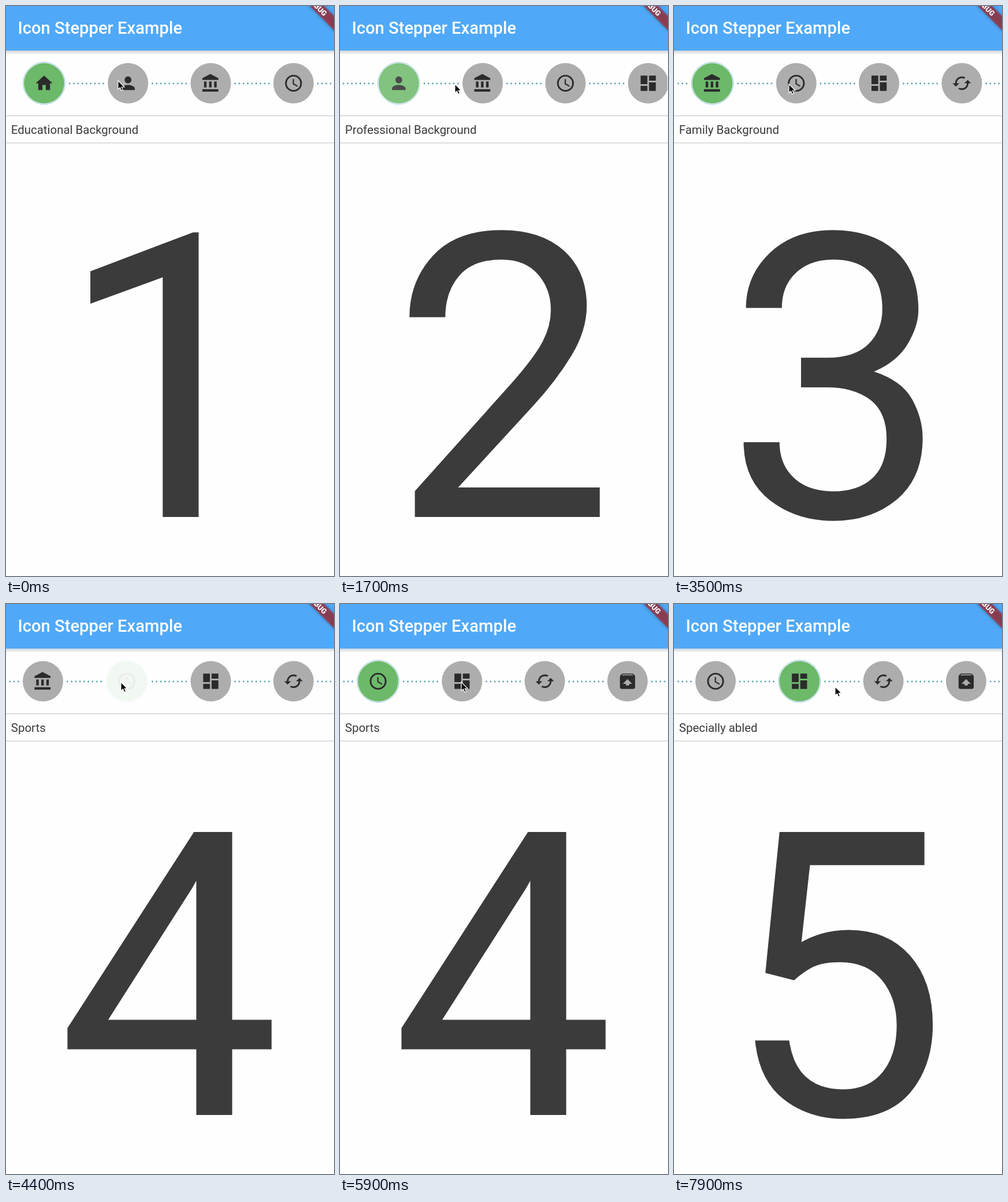
Animation of 568 by 985 pixels, one loop 8000 ms. Source, as an HTML page:

```html
<!DOCTYPE html>
<html lang="en">
<head>
<meta charset="utf-8">
<title>Icon Stepper Example</title>
<style>
  html, body { margin: 0; width: 100%; height: 100%; overflow: hidden; background: #fefefe; }
  svg { display: block; width: 568px; height: 985px; font-family: Roboto, sans-serif; }
</style>
</head>
<body>
<svg viewBox="0 0 568 985">
  <defs>
    <linearGradient id="shade" x2="0" y2="1">
      <stop offset="0" stop-color="#cfd6dc"/>
      <stop offset="1" stop-color="#f4f4f4"/>
    </linearGradient>
    <clipPath id="view"><rect x="4" y="84" width="563" height="104"/></clipPath>
  </defs>
  <rect width="568" height="985" fill="#fefefe"/>
  <rect y="77" width="568" height="6" fill="url(#shade)"/>
  <rect width="568" height="77" fill="#50a9f8"/>
  <text x="20.4" y="47.5" font-size="29.2" font-weight="500" fill="#fff">Icon Stepper Example</text>
  <g transform="translate(553.5 15) rotate(45)">
    <rect x="-80" y="-8.8" width="160" height="17.6" fill="#b71c1c" fill-opacity=".63"
          style="filter: drop-shadow(0 0 3px rgba(0,0,0,.5))"/>
    <text y="4.5" font-size="12.6" font-weight="900" fill="#fff" text-anchor="end">DEBUG</text>
  </g>
  <g id="stepper" clip-path="url(#view)"></g>
  <path d="M0 189.7H568M0 236.7H568" stroke="#ccc" stroke-width="1.2"/>
  <text id="label" x="8.8" y="221" font-size="20.44" fill="#3a3a3a"></text>
  <text id="digit" x="282" y="883" font-size="688" fill="#3b3b3b" text-anchor="middle"></text>
  <path id="cursor" d="M0 0V15.2L3.5 12 5.8 17.2 8.4 16.1 6.2 11H11Z" stroke="#fff" stroke-width="1.2"/>
</svg>
<script>
const LOOP = 8000, GAP = 73.3, STEP = 70 + GAP, LEFT = 29, MID = 133.5;
const FADE = 750, SCROLL = 1000, LAG = 95;
const clicks = [1062, 2680, 4340, 6060];
const labels = ['Educational Background', 'Professional Background', 'Family Background',
  'Sports', 'Specially abled'];

// Material icons on a 24 unit grid
const icons = [
  'M10 20v-6h4v6h5v-8h3L12 3 2 12h3v8z',
  'M12 12c2.21 0 4-1.79 4-4s-1.79-4-4-4-4 1.79-4 4 1.79 4 4 4zm0 2c-2.67 0-8 1.34-8 4v2h16v-2c0-2.66-5.33-4-8-4z',
  'M4 10v7h3v-7zm6 0v7h3v-7zM2 22h19v-3H2zm14-12v7h3v-7zM11.5 1L2 6v2h19V6z',
  'M12 2a10 10 0 1 0 0 20 10 10 0 1 0 0-20zm0 2a8 8 0 1 1 0 16 8 8 0 1 1 0-16zM12.5 7H11v6l5.25 3.15.75-1.23-4.5-2.67z',
  'M3 13h8V3H3zm0 8h8v-6H3zm10 0h8V11h-8zm0-18v6h8V3z',
  'M19 8l-4 4h3c0 3.31-2.69 6-6 6-1.01 0-1.97-.25-2.8-.7l-1.46 1.46C8.97 19.54 10.43 20 12 20c4.42 0 8-3.58 8-8h3zM6 12c0-3.31 2.69-6 6-6 1.01 0 1.97.25 2.8.7l1.46-1.46C15.03 4.46 13.57 4 12 4c-4.42 0-8 3.58-8 8H1l4 4 4-4z',
  'M20.55 5.22l-1.39-1.68C18.88 3.21 18.47 3 18 3H6c-.47 0-.88.21-1.15.55L3.46 5.22C3.17 5.57 3 6.01 3 6.5V19c0 1.1.89 2 2 2h14c1.1 0 2-.9 2-2V6.5c0-.49-.17-.93-.45-1.28zM12 9.5l5.5 5.5H14v2h-4v-2H6.5zM5.12 5l.82-1h12l.93 1z',
  'M22 3H7c-.69 0-1.23.35-1.59.88L0 12l5.41 8.11c.36.53.9.89 1.59.89h15c1.1 0 2-.9 2-2V5c0-1.1-.9-2-2-2zm-3 12.59L17.59 17 14 13.41 10.41 17 9 15.59 12.59 12 9 8.41 10.41 7 14 10.59 17.59 7 19 8.41 15.41 12z'
];

// Pointer stops: time, x, y
const path = [[0, 194, 129], [400, 194, 129], [600, 199, 135], [5250, 199, 135], [5800, 210, 135],
  [6150, 210, 135], [6600, 171, 139], [7200, 127.7, 141], [7900, 279, 143], [8000, 279, 143]];

const $ = id => document.getElementById(id);
const clamp = v => Math.min(1, Math.max(0, v));
const smooth = p => p * p * (3 - 2 * p);

function bounce(p) {
  const k = 7.5625, d = 2.75;
  if (p < 1 / d) return k * p * p;
  if (p < 2 / d) return k * (p - 1.5 / d) ** 2 + .75;
  if (p < 2.5 / d) return k * (p - 2.25 / d) ** 2 + .9375;
  return k * (p - 2.625 / d) ** 2 + .984375;
}

function pointer(t) {
  const i = Math.max(1, path.findIndex(s => s[0] >= t));
  const [t0, x0, y0] = path[i - 1], [t1, x1, y1] = path[i];
  const p = smooth((t - t0) / (t1 - t0));
  return [x0 + (x1 - x0) * p, y0 + (y1 - y0) * p];
}

const dots = Array.from({ length: 9 }, (_, n) =>
  `<circle cx="${7.2 + n * 7.3}" r="1.45"/>`).join('');

$('stepper').innerHTML = icons.map(d => `<g>
  <g class="step">
    <circle class="ring" r="36.4" fill="#fff" stroke="#8cc2de"/>
    <circle class="disc" r="35"/>
    <path d="${d}" fill="#2b2b2b" fill-rule="evenodd" transform="scale(1.46) translate(-12 -12)"/>
  </g>
  <g class="line" fill="#58a5b9">${dots}</g>
</g>`).join('');

const steps = [...$('stepper').children].map(g => ({
  step: g.querySelector('.step'), ring: g.querySelector('.ring'),
  disc: g.querySelector('.disc'), line: g.querySelector('.line')
}));

const move = (el, x, y) => el.setAttribute('transform', `translate(${x.toFixed(2)} ${y.toFixed(2)})`);

function draw(t) {
  const active = clicks.filter(c => c <= t).length;
  const since = active ? t - clicks[active - 1] : LOOP;
  const [cx, cy] = pointer(t);
  const drag = t > 7200 ? cx - 127.7 : 0;
  const scroll = active ? active - 1 + bounce(clamp((since - LAG) / SCROLL)) : 0;

  let x = LEFT - scroll * STEP + drag;
  steps.forEach((s, i) => {
    const on = i === active, w = on ? 74 : 70;
    move(s.step, x + w / 2, MID);
    s.step.setAttribute('opacity', on ? clamp(since / FADE) : 1);
    s.ring.setAttribute('visibility', on ? 'visible' : 'hidden');
    s.disc.setAttribute('fill', on ? '#6cb96a' : '#adadad');
    move(s.line, x + w, MID + .5);
    x += w + GAP;
  });

  $('label').textContent = labels[active];
  $('digit').textContent = active + 1;
  move($('cursor'), cx, cy);
}

const start = performance.now();
function tick() {
  draw((performance.now() - start) % LOOP);
  requestAnimationFrame(tick);
}
tick();
</script>
</body>
</html>
```
